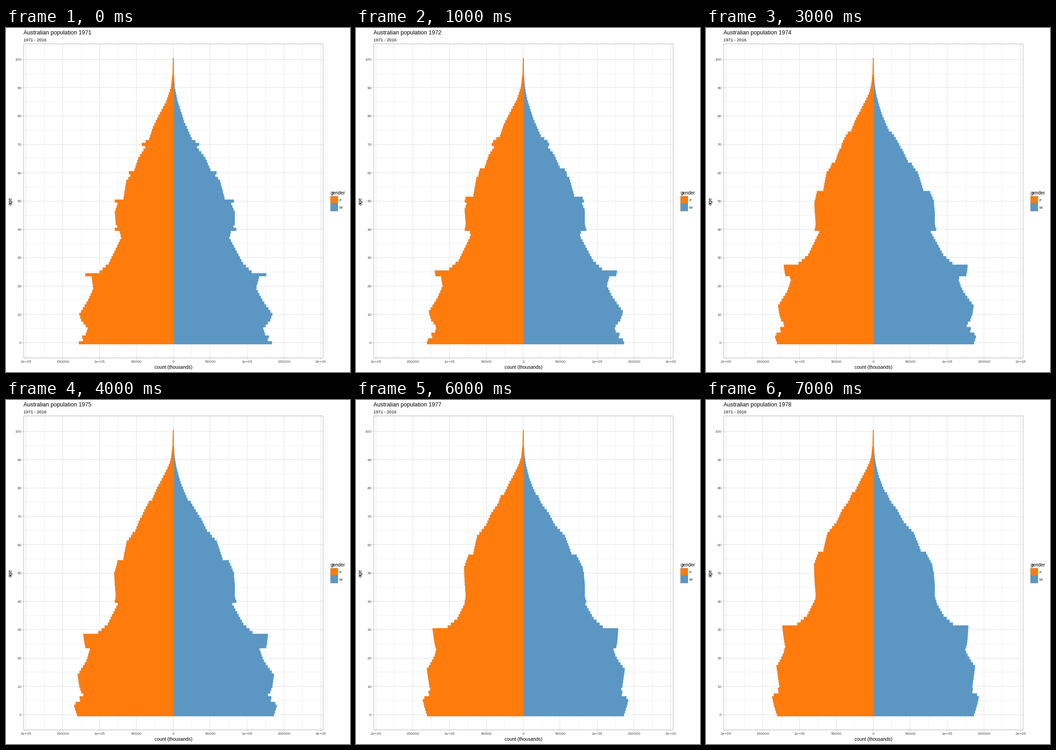
A matplotlib script that plays this animation: 748 px wide and 748 px high, repeating every 8000 ms.

```python
import numpy as np
import matplotlib.pyplot as plt
from matplotlib.animation import FuncAnimation
from matplotlib.patches import Polygon, Rectangle

SIZE, DPI = 748, 88
PT = 72 / DPI                      # points per pixel
FIRST_YEAR, YEARS = 1971, 8
CENTER, AGE_0, ROW = 363.8, 684.3, 6.16
STEP = 80.15                       # pixels per 50000 people
LEFT, TOP, RIGHT, BOTTOM = 38.5, 34.5, 689.5, 717.5
ORANGE, BLUE = "#ff7b0b", "#5c96c2"
MAJOR, MINOR, BORDER, TICK_TEXT = "#e2e2e2", "#f0f0f0", "#b9b9b9", "#4d4d4d"
AGES = np.arange(101)

# Key points of the female age profile: (age, bar length in pixels)
PROFILE = [(0, 205), (1, 196), (2, 198), (3, 190), (5, 186), (8, 200),
           (10, 204), (15, 185), (19, 174), (23, 177), (24, 191), (25, 160),
           (28, 140), (33, 125), (37, 113), (39, 116), (42, 125), (46, 127),
           (50, 119), (51, 108), (57, 102), (61, 84), (65, 76), (69, 61),
           (71, 60), (72, 52), (76, 44), (80, 32), (85, 15.5), (90, 5),
           (95, 1.5), (100, .5)]
# Men per woman by age
SEX_RATIO = [(0, 1.045), (10, 1.055), (20, 1.035), (28, 1.08), (40, 1.075),
             (50, 1.035), (58, .99), (66, .91), (72, .77), (78, .61), (90, .6)]


def lookup(points):
    xs, ys = zip(*points)
    return np.interp(AGES, xs, ys)


def growth(death, steepness):
    """Yearly change by age: migration minus mortality."""
    arrivals = (.004 + .006 * np.exp(-AGES / 5)
                + .008 * np.exp(-((AGES - 21.5) / 3) ** 2))
    return arrivals - death * np.exp(steepness * (AGES - 77))


def age_by_one(values, newborn):
    return np.concatenate([[newborn], values[:-1]])


def bar_lengths(ratio, rate):
    """Bars per year and age; each year is drawn over the ones before it."""
    people = lookup(PROFILE) * ratio
    # Round ages are over-reported at first
    heap = 8 * ratio * ((AGES % 10 == 0) & (AGES >= 40) & (AGES < 80))
    rows = []
    for t in range(YEARS):
        rows.append(np.maximum(people + heap * max(0, 1 - t / 5), .8))
        births = 209.5 if t == 0 else 207
        people = age_by_one(people * (1 + rate), births * ratio[0])
        heap = age_by_one(heap, 0)
    return np.maximum.accumulate(rows)


def outline(lengths, side, inner):
    edges = AGE_0 - ROW * (np.arange(102) - .5)
    y = np.repeat(edges, 2)[1:-1]
    x = CENTER + side * np.repeat(lengths, 2)
    return np.column_stack([np.r_[inner, x, inner], np.r_[y[0], y, y[-1]]])


fig = plt.figure(figsize=(SIZE / DPI, SIZE / DPI), dpi=DPI, facecolor="white")
ax = fig.add_axes([0, 0, 1, 1])
ax.set(xlim=(0, SIZE), ylim=(SIZE, 0))
ax.axis("off")


def line(x, y, color):
    ax.plot(x, y, color=color, lw=PT, solid_capstyle="butt", snap=False,
            zorder=1)


def label(x, y, text, px, color="black", **kw):
    return ax.text(x, y, text, fontsize=px * PT, color=color, va="baseline",
                   family="Liberation Sans", zorder=4, **kw)


def vline(x, color, top=TOP, bottom=BOTTOM):
    x = np.floor(x) + .5
    line([x, x], [top, bottom], color)


def hline(y, color, left=LEFT, right=RIGHT):
    y = np.floor(y) + .5
    line([left, right], [y, y], color)


def bars(color, zorder):
    return ax.add_patch(Polygon([[0, 0]], fc=color, ec=color, lw=.6 * PT,
                                joinstyle="miter", snap=False, zorder=zorder))


for k in range(-4, 4):
    vline(CENTER + (k + .5) * STEP, MINOR)
for age in range(-5, 106, 10):
    hline(AGE_0 - ROW * age, MINOR)

names = ["2e+05", "150000", "1e+05", "50000", "0"]
for k, name in enumerate(names + names[-2::-1]):
    x = CENTER + (k - 4) * STEP
    vline(x, MAJOR)
    vline(x, BORDER, BOTTOM, BOTTOM + 3)
    label(x, 728.5, name, 8.23, TICK_TEXT, ha="center")
for age in range(0, 101, 10):
    y = AGE_0 - ROW * age
    hline(y, MAJOR)
    hline(y, BORDER, LEFT - 3, LEFT)
    label(33.8, y + 3, str(age), 8.23, TICK_TEXT, ha="right")

ax.add_patch(Rectangle((LEFT, TOP), RIGHT - LEFT, BOTTOM - TOP, fill=False,
                       ec=BORDER, lw=PT, snap=False, zorder=3))

title = label(38, 14, "", 12.34)
label(38, 29, "1971 - 2016", 9.26)
label(CENTER, 741, "count (thousands)", 10.29, ha="center")
label(13, 376, "age", 10.29, ha="center", rotation=90, rotation_mode="anchor")

label(705.3, 361.5, "gender", 10.29)
for y, color, name in [(365.7, ORANGE, "F"), (381.9, BLUE, "M")]:
    ax.add_patch(Rectangle((705.6, y), 16.2, 16.2, fc=color, ec="#7f7f7f",
                           lw=.4 * PT, snap=False, zorder=2))
    label(724, y + 11.2, name, 8.23)

female = bar_lengths(np.ones(101), growth(.055, .12))
male = bar_lengths(lookup(SEX_RATIO), growth(.085, .075))
right = bars(BLUE, 2)
left = bars(ORANGE, 2.5)


def update(i):
    title.set_text(f"Australian population {FIRST_YEAR + i}")
    left.set_xy(outline(female[i], -1, CENTER + .9))
    right.set_xy(outline(male[i], 1, CENTER))
    return title, left, right


anim = FuncAnimation(fig, update, frames=YEARS, interval=1000, repeat=True,
                     repeat_delay=0, blit=False)
plt.show()
```
